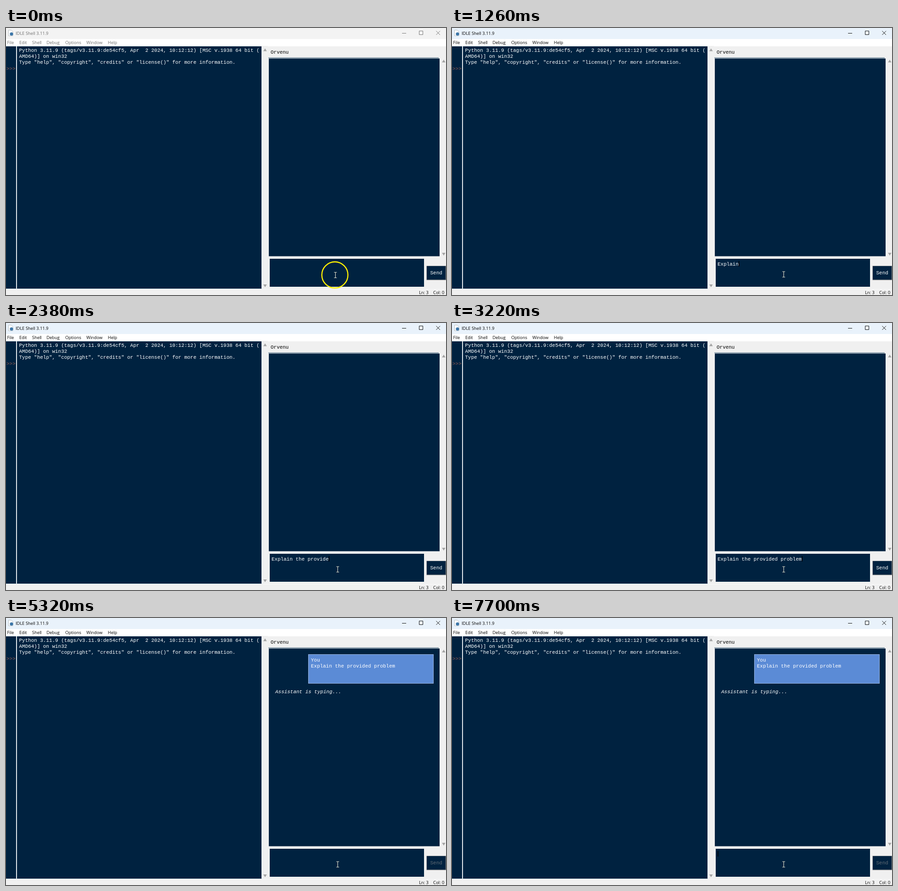
Animation of 961 by 582 pixels, one loop 8 s. Source, as an HTML page:

```html
<!DOCTYPE html>
<html lang="en">
<head>
<meta charset="utf-8">
<title>IDLE Shell</title>
<style>
  html, body { margin: 0; width: 100%; height: 100%; overflow: hidden; background: #f0f0f0; }
  svg { display: block; }
  text { white-space: pre; }
  .mono { font: 10.95px "Liberation Mono", "Courier New", monospace; fill: #fff; }
  .ui { font: 9.4px "Open Sans", "Noto Sans", sans-serif; fill: #000; }
  .navy { fill: #002240; }
  .arrow { fill: #a3a3a3; }
  .line { fill: none; stroke: #111; stroke-width: 1; }
  .idle .chrome { fill: #6e6e6e; }
  .idle .line { stroke: #777; }
  #bar { fill: #e9f2fb; }
  .idle #bar { fill: #f3f3f3; }
</style>
</head>
<body>
<svg id="stage" width="961" height="582" viewBox="0 0 961 582">
  <rect width="961" height="582" fill="#f0f0f0"/>

  <!-- title bar and menu -->
  <rect id="bar" width="961" height="24"/>
  <path d="M5.5 4.500h6l3.500 3.500v9h-9.500z" fill="#fff" stroke="#a9b0b5" stroke-width=".8"/>
  <circle cx="12" cy="13" r="3.600" fill="#3c76a8"/>
  <text class="ui chrome" x="21" y="14.500">IDLE Shell 3.11.9</text>
  <path class="line" d="M865 11.500h9M902.500 6.500h8v8h-8zM939.500 6.500l8.500 8.500M948 6.500l-8.500 8.500"/>
  <rect y="24" width="961" height="16" fill="#fff"/>
  <g id="menu"></g>

  <!-- shell -->
  <rect x="0" y="39" width="572" height="1" fill="#f0f0f0"/>
  <rect class="navy" y="40" width="22" height="528"/>
  <rect x="22" y="40" width="2" height="529" fill="#e6eaee"/>
  <rect class="navy" x="24" y="40" width="534" height="528"/>
  <rect y="568" width="559" height="1" fill="#c4ccd3"/>
  <rect y="569" width="961" height="1" fill="#fafafa"/>
  <g class="mono">
    <text x="28.500" y="52">Python 3.11.9 (tags/v3.11.9:de54cf5, Apr  2 2024, 10:12:12) [MSC v.1938 64 bit (</text>
    <text x="28.500" y="65">AMD64)] on win32</text>
    <text x="28.500" y="78">Type "help", "copyright", "credits" or "license()" for more information.</text>
    <text x="1" y="91.500" style="fill:#8d5c50">&gt;&gt;&gt;</text>
  </g>
  <path class="arrow" d="M562 50.500l3.800-6 3.800 6zM562 559l3.800 6 3.800-6zM952.200 75l3.800-6 3.800 6zM952.200 490l3.800 6 3.800-6z"/>

  <!-- chat -->
  <text class="mono" x="578" y="56" style="fill:#000">Orvenu</text>
  <rect x="573" y="64.500" width="372" height="1" fill="#2d526f"/>
  <rect class="navy" x="574" y="66.500" width="373" height="431"/>
  <g id="reply">
    <rect x="660.500" y="79.500" width="273" height="63" fill="#5b8bd6" stroke="#9bb5dc"/>
    <g class="mono">
      <text x="666" y="94.500">You</text>
      <text x="666" y="107.500">Explain the provided problem</text>
      <text x="588" y="163.500" font-style="italic">Assistant is typing...</text>
    </g>
  </g>
  <rect class="navy" x="576" y="503" width="337" height="61"/>
  <text id="typed" class="mono" x="580" y="517.500"></text>
  <rect id="caret" y="508" width="1.400" height="12" fill="#000"/>
  <rect x="918.500" y="518.500" width="43" height="31" fill="#777"/>
  <rect class="navy" x="919" y="519" width="41" height="29.500"/>
  <text id="send" class="mono" x="926.500" y="537">Send</text>

  <text class="ui" x="902" y="580">Ln: 3</text>
  <text class="ui" x="933" y="580">Col: 0</text>

  <circle id="ring" cx="718.300" cy="538.300" r="28.500" fill="none" stroke="#fff200" stroke-width="2.400"/>
  <path id="mouse" d="M-3 -6h2.300l.7.700.7-.7h2.300M0 -5.500v11M-3 6h2.300l.7-.7.7.7h2.300" fill="none" stroke="#e9e6d0" stroke-width="1.100"/>
</svg>
<script>
const $ = id => document.getElementById(id);
const LOOP = 8000, STEP = 140, ADVANCE = 6.571;
const MESSAGE = "Explain the provided problem";
const FOCUS = 140, RING_END = 280, MOVE_END = 420, TYPE_START = 600, CHAR_MS = 93.3, SENT = 3500;
const BLINKS = [3780, 4480, 4760, 5320, 5740, 6440, 6720, 7280, 7700];

const menu = { File: 2.5, Edit: 29, Shell: 57, Debug: 88.5, Options: 129.5, Window: 175.5, Help: 222.5 };
$("menu").innerHTML = Object.entries(menu)
  .map(([name, x]) => `<text class="ui chrome" x="${x}" y="35">${name}</text>`).join("");

const show = (id, on) => $(id).style.display = on ? "" : "none";

function draw(time) {
  const t = Math.floor(time / STEP) * STEP;
  const sent = t >= SENT;
  const count = sent ? 0 : Math.max(0, Math.floor((t - TYPE_START) / CHAR_MS));
  const text = MESSAGE.slice(0, count);
  const move = Math.min(1, t / MOVE_END);

  $("stage").classList.toggle("idle", t < FOCUS);
  show("ring", t < RING_END);
  $("mouse").setAttribute("transform", `translate(${719.5 + 5 * move} ${538.5 - 1.5 * move})`);

  $("typed").textContent = text;
  $("caret").setAttribute("x", 580 + text.length * ADVANCE);
  show("caret", sent ? BLINKS.filter(b => b <= t).length % 2 : t >= FOCUS);
  show("reply", sent);
  $("send").style.fill = sent ? "#626c75" : "#fff";
}

const start = performance.now();
function frame() {
  draw((performance.now() - start) % LOOP);
  requestAnimationFrame(frame);
}
frame();
</script>
</body>
</html>
```
